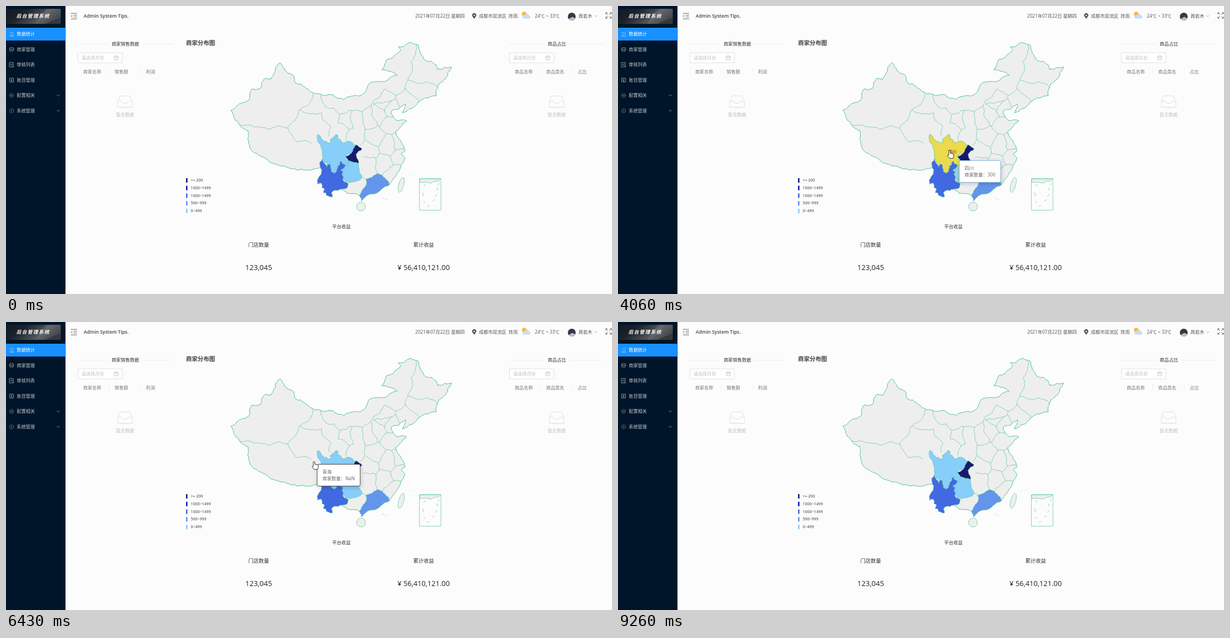
Animation, 1084 px wide and 517 px high, one loop 9870 ms. Source, as an HTML page:

```html
<!DOCTYPE html>
<html>
<head>
<meta charset="utf-8">
<title>Admin dashboard</title>
<style>
  html, body { margin: 0; width: 100%; height: 100%; overflow: hidden; background: #fcfcfc; }
  body, text { font-family: "Open Sans", "Noto Sans CJK SC", "Noto Sans CJK", sans-serif; }
  svg { position: absolute; left: 0; top: 0; }
  .land, .line { stroke: #62cb98; stroke-width: .75; vector-effect: non-scaling-stroke; stroke-linejoin: round; }
  .land { fill: #eee; }
  .line { fill: none; }
  .icon { fill: none; stroke-width: .8; }
  #tip { position: absolute; left: 0; top: 0; padding: 7px 9px; font-size: 8.2px; line-height: 12px; color: #666;
    white-space: nowrap; background: #fff; border: 1px solid; border-radius: 3px; box-shadow: 1px 2px 7px rgba(0,0,0,.2); }
</style>
</head>
<body>
<svg id="stage" width="1084" height="517" viewBox="0 0 1084 517"></svg>
<div id="tip"></div>
<svg width="1084" height="517">
  <path id="arrow" d="M0 0V14L3.4 11 5.6 16 7.8 15 5.7 10.3H10Z" fill="#fff" stroke="#000" stroke-width=".8"/>
  <path id="hand" d="M-1.3 8.5V1Q0-.8 1.3 1V5.5Q3 4.6 3.8 6 5.2 5.2 6 6.7 7.5 6.3 7.6 8V11L6.3 14.5H.2L-3.6 9.5Q-3.5 7.6-1.3 9Z" fill="#fff" stroke="#222" stroke-width=".9"/>
</svg>
<script>
const LOOP = 9870, LAG = 200, FADE = 300, YELLOW = '#fedd2a';
const clamp = v => Math.max(0, Math.min(1, v));
const noise = (x, y) => { const s = Math.sin(x * 12.9898 + y * 78.233) * 43758.5453; return s - Math.floor(s) - .5; };
const pairs = str => str.match(/\d+ \d+/g).map(pair => pair.split(' ').map(Number));

// Adds a jagged edge from a to b; the same edge walked backwards gives the same line.
function jag(a, b, out) {
  const dx = b[0] - a[0], dy = b[1] - a[1];
  if (Math.hypot(dx, dy) < 3.5) return out.push(b);
  const side = dx > 0 || (dx === 0 && dy > 0) ? 1 : -1;
  const k = noise(a[0] + b[0], a[1] + b[1]) * .26 * side;
  const mid = [(a[0] + b[0]) / 2 - dy * k, (a[1] + b[1]) / 2 + dx * k];
  jag(a, mid, out);
  jag(mid, b, out);
}
function coast(points) {
  const out = [points[0]];
  points.forEach((p, i) => jag(p, points[(i + 1) % points.length], out));
  return toPath(out);
}
function edge(a, b) {
  const out = [a];
  jag(a, b, out);
  return toPath(out);
}
const toPath = points => 'M' + points.map(p => p.map(v => v.toFixed(1)).join()).join('L');

// Splits the plane into the areas nearest to each site; `next` names the site across the edge that starts at `p`.
function cell(site, sites) {
  let poly = [[380, 40], [820, 40], [820, 390], [380, 390]].map(p => ({ p }));
  const away = (p, s) => Math.hypot(p[0] - s.p[0], p[1] - s.p[1]) ** 2;
  for (const other of sites) {
    if (other === site) continue;
    const cut = [];
    poly.forEach((a, i) => {
      const b = poly[(i + 1) % poly.length];
      const da = away(a.p, site) - away(a.p, other), db = away(b.p, site) - away(b.p, other);
      if (da <= 0) cut.push(a);
      if ((da <= 0) !== (db <= 0)) {
        const k = da / (da - db);
        cut.push({ p: a.p.map((v, n) => v + (b.p[n] - v) * k), next: da <= 0 ? other : a.next });
      }
    });
    poly = cut;
  }
  return poly.map(({ p, next }) => ({ p: p.map(Math.round), next }));
}

// A map: one outline, districts grown around their centres, some of them coloured.
function mapLayer(id, outline, named, single, colors, extra = '') {
  const sites = pairs(single).map((p, i) => ({ p, name: i }));
  for (const name in named) sites.push(...pairs(named[name]).map(p => ({ p, name })));
  let lines = '';
  const shapes = {};
  sites.forEach((site, i) => {
    const poly = cell(site, sites);
    shapes[site.name] = (shapes[site.name] || '') + coast(poly.map(v => v.p)) + 'Z';
    poly.forEach(({ p, next }, k) => {
      const shared = next && sites.indexOf(next) > i && next.name !== site.name;
      if (shared && site.name !== 'outlined' && next.name !== 'outlined') lines += edge(p, poly[(k + 1) % poly.length].p);
    });
  });
  const d = coast(pairs(outline));
  const fills = Object.keys(colors).map(name =>
    `<path d="${shapes[name]}" fill="${colors[name]}"/><path id="${name}" d="${shapes[name]}" fill="${YELLOW}" opacity="0"/>`).join('');
  return `<g id="${id}"><clipPath id="${id}Clip"><path d="${d}"/></clipPath><path class="land" d="${d}"/>` +
    `<g clip-path="url(#${id}Clip)">${fills}<path class="line" d="${lines}"/></g><path class="line" d="${d}"/>${extra}</g>`;
}
const province = (name, outline, fill, transform = '') => [[name, fill, 1], [name + 'Glow', YELLOW, 0]].map(([id, color, opacity]) =>
  `<path class="land" id="${opacity ? id + 'Base' : name}" d="${coast(pairs(outline))}" style="fill:${color}" opacity="${opacity}" transform="${transform}"/>`).join('');

const chinaOutline = `402 187 413 179 434 169 439 150 455 148 463 130 474 131 490 102 499 116 512 123 518 138 553 158 584 159 605 168
  637 159 650 139 666 135 700 124 672 115 680 97 706 78 702 73 724 65 737 70 750 98 769 105 772 114 797 109 787 130 774 140
  770 161 737 173 709 192 715 176 689 189 692 198 700 206 717 206 697 225 707 245 714 260 707 265 714 273 699 302 683 323
  650 338 636 350 633 341 610 336 580 310 563 290 530 293 502 289 482 284 450 266 436 254 433 224 410 205`;
const chinaCentres = {
  新疆: '470 170 470 197 498 193 524 160', 西藏: '465 243 487 240 530 272 540 278', 青海: '530 213 550 201 562 221',
  甘肃: '553 180 582 197 598 227', 内蒙古: '587 169 600 178 632 174 660 152 690 138 705 105 712 85', 陕西: '630 203 624 236',
  河北: '668 194 676 166', 吉林: '738 156 760 154', 黑龙江: '745 118 740 88 772 132', 广东: '666 321 645 341', 贵州: '617 295',
  outlined: '575 255 610 256 624 263 578 302 585 325'
};
const chinaSingles = `611 205 650 200 678 179 687 185 718 172 690 212 660 236 704 245 684 250 648 258 705 273 677 285 648 287 692 301 626 328`;
const chongqing = '626 249 637 257 626 266 631 282 613 278 607 270 620 261';

const sichuanOutline = `527 297 519 284 507 275 501 291 492 250 488 205 481 172 454 120 446 88 450 68 460 65 475 78 486 102 497 107 505 123
  515 113 533 128 556 128 549 104 563 90 577 82 590 66 598 65 610 75 607 99 631 108 633 120 660 128 672 119 712 121 731 143
  753 152 738 180 708 222 692 211 675 218 671 260 691 264 683 282 691 300 672 308 640 298 637 280 624 272 602 310 603 345
  570 369 548 335 553 324`;
const sichuanCentres = {
  甘孜藏族自治州: '530 165 560 200 558 245 515 270', 凉山彝族自治州: '560 283 545 286 590 300 588 340',
  阿坝: '570 140 598 172', 雅安: '606 215 595 242'
};
const sichuanSingles = '645 150 680 135 707 143 730 165 685 185 640 178 620 205 660 203 645 222 622 238 625 260 660 240 650 257 650 282 675 285 705 205 560 350';

const yunnanOutline = `519 65 526 92 549 118 551 132 568 107 580 112 589 150 589 167 612 178 629 165 632 148 656 106 655 88 669 87 671 103
  697 110 692 132 663 152 668 163 680 165 671 190 682 212 681 237 721 262 716 288 698 303 650 306 640 317 628 312 596 326
  588 332 597 365 570 360 549 353 546 335 524 331 535 305 527 296 514 291 510 257 480 267 478 233 494 204 508 188 514 152
  497 116 496 97 511 84`;
const yunnanSingles = '530 108 502 112 555 150 532 186 505 215 492 240 535 265 587 205 622 210 655 200 655 130 592 258 630 280 685 270 562 308 572 348';

// Small drawing helpers
const text = (x, y, size, content, fill = '#555', extra = '') =>
  `<text x="${x}" y="${y + size * .36}" font-size="${size}" fill="${fill}" ${extra}>${content}</text>`;
const middle = 'text-anchor="middle"';
const rect = (x, y, w, h, fill, extra = '') => `<rect x="${x}" y="${y}" width="${w}" height="${h}" fill="${fill}" ${extra}/>`;
const icon = (d, stroke, x = 0, y = 0) => `<path class="icon" d="${d}" stroke="${stroke}" transform="translate(${x} ${y})"/>`;
const chevron = (x, y, color) => icon('M-2.5-1.2L0 1.2 2.5-1.2', color, x, y);

function sidebar() {
  const items = [
    ['数据统计', 'M-4 4H4M-3 3V1M0 3V0M3 3V-1M-4-1L-1-3 1-2 4-4'],
    ['商家管理', 'M-3-3H3L4 0H-4ZM-3 0V3H3V0'],
    ['审核列表', 'M-4-4H3V4H-4ZM-2-1H2M-2 1H0M1 1L4 4'],
    ['账目管理', 'M-3.5-3.5H3.5V3.5H-3.5ZM-1.5-2L0 0 1.5-2M0 0V2.5M-1.5 .8H1.5'],
    ['配置相关', 'M-3.5 0A3.5 3.5 0 1 1 3.5 0A3.5 3.5 0 1 1-3.5 0M-3 0H3M0-1V2'],
    ['系统管理', 'M-3.5-2L0-4 3.5-2V2L0 4-3.5 2ZM-1 0A1 1 0 1 1 1 0A1 1 0 1 1-1 0']];
  return rect(0, 0, 106.4, 517, '#001529') + rect(1, 5, 97, 27, 'url(#banner)', 'rx="1.5"') +
    '<path d="M52 32L72 5H98V20L70 32Z" fill="#fff" opacity=".1"/>' +
    text(48.5, 18.3, 8.6, '后台管理系统', '#fff', middle + ' font-weight="900" font-style="italic" letter-spacing="1.4"') +
    rect(0, 39, 106.4, 23, '#1890ff') +
    items.map(([label, d], i) => {
      const y = 50.3 + i * 27.55, color = i ? '#a6adb4' : '#a9d6ff';
      return icon(d, i > 3 ? '#6b7783' : color, 10, y) + text(19.3, y, 8.1, label, i ? '#c3c8cd' : '#fff') + (i > 3 ? chevron(93.5, y, color) : '');
    }).join('');
}
function header() {
  return icon('M0 0H11M5 3.3H11M5 6.6H11M0 10H11M3 2.8L.5 5 3 7.2', '#444', 116, 13.2) +
    text(139, 18, 8.55, 'Admin System Tips.', '#444', 'font-weight="600"') +
    text(732, 18, 8.2, '2021年07月22日 星期四') +
    '<path d="M837.5 23L834.8 19.2A3.7 3.7 0 1 1 840.2 19.2Z" fill="#555"/><circle cx="837.5" cy="17" r="1.3" fill="#fcfcfc"/>' +
    text(846, 18, 8.2, '成都市双流区') + text(899, 18, 8.2, '阵雨') +
    '<circle cx="927" cy="14.5" r="4.3" fill="#f7b944"/><path d="M926 22.5Q922 21 924.5 17.5 926 15.5 928 16.5 930 12.5 934 14.5 935.5 15.5 935.5 17 939.5 18 938 21 937 22.8 935 22.8Z" fill="#c9dcf2"/>' +
    text(946, 18, 8.2, '24℃ ~ 33℃') +
    '<circle cx="1012" cy="19" r="7" fill="#343943"/><path d="M1006.5 23.3A7 7 0 0 0 1018.2 22L1013 19.5Z" fill="#b9c0c8"/>' +
    text(1024, 18, 8.2, '周若木') + chevron(1055, 18, '#999') +
    icon('M0 3V0H3M7 0H10V3M10 7V10H7M3 10H0V7M0 0L3.7 3.7M10 0L6.3 3.7M10 10L6.3 6.3M0 10L3.7 6.3', '#444', 1073, 12);
}
function panel(x, title, columns) {
  const half = title.length * 4.1 + 6;
  return `<g transform="translate(${x})">` + icon(`M128 68.5H${213.5 - half}M${213.5 + half} 68.5H298`, '#ebebeb') +
    text(213.5, 68, 8.2, title, '#333', middle) +
    rect(128.5, 84, 79.5, 18, '#fff', 'stroke="#d9d9d9" stroke-width=".8" rx="1"') + text(135, 93, 8.1, '请选择月份', '#bfbfbf') +
    icon('M0 1H7V7.5H0ZM0 3.3H7M2 0V2M5 0V2', '#bbb', 193.7, 89) +
    columns.map((label, i) => text(138 + i * 56.3, 117.8, 8.1, label, '#777')).join('') +
    icon('M184.5 112V123M240.5 112V123', '#eee') +
    '<ellipse cx="213" cy="181" rx="14" ry="3" fill="#f5f5f5"/><path d="M200 171L204.5 161.5H221.5L226 171V181.5H200ZM200 171H207.5Q208.5 174.5 210 174.5H216Q217.5 174.5 218.5 171H226" fill="#fdfdfd" stroke="#d9d9d9" stroke-width=".8"/>' +
    text(213, 195, 8.1, '暂无数据', '#bfbfbf', middle) + '</g>';
}
function legend() {
  return [['&gt;= 200', '#191970'], ['1000~1499', '#1717c4'], ['1000~1499', '#4169e1'], ['500~999', '#6495ed'], ['0~499', '#87cefa']]
    .map(([label, color], i) => rect(322, 309 + i * 13.75, 2.6, 8, color) + text(330.5, 312.5 + i * 13.75, 7, label, '#333')).join('');
}
function islands() {
  return '<ellipse class="land" cx="635" cy="360" rx="8" ry="8"/><ellipse class="land" cx="707" cy="321" rx="4.5" ry="14" transform="rotate(15 707 321)"/>' +
    '<path class="land" d="M740 310H778L774 314 765 315 761 318 750 316 740 317Z"/><rect class="line" x="739.5" y="310" width="38.5" height="56.5"/>' +
    '<path class="line" d="M750 320L747 324M745 335L747 341M747 350L749 353M753 360L757 358M763 351L767 347M768 342L771 338M771 331V326M773 322L775 318M722 304H723M730 302H731M675 344V346M680 346V348"/>';
}

const $ = id => document.getElementById(id);
const labels = { 贵州: [617, 295], 四川: [598, 261], 云南: [581.5, 311], 甘孜藏族自治州: [572.5, 220.5], 凉山彝族自治州: [572, 300] };
$('stage').innerHTML =
  '<defs><linearGradient id="banner" x2="1" y2=".35"><stop stop-color="#111a25"/><stop offset=".35" stop-color="#1b222b"/><stop offset=".75" stop-color="#535559"/><stop offset="1" stop-color="#34383d"/></linearGradient></defs>' +
  sidebar() + header() +
  panel(0, '商家销售数据', ['商家名称', '销售额', '利润']) +
  panel(772, '商品占比', ['商品名称', '商品类名', '占比']) +
  text(322, 66, 10.4, '商家分布图', '#444', 'font-weight="700"') + legend() +
  mapLayer('china', chinaOutline, chinaCentres, chinaSingles, { 贵州: '#87cefa', 广东: '#6495ed' },
    province('四川', sichuanOutline, '#87cefa', 'matrix(.2342 0 0 .234 451.4 215.5)') +
    province('云南', yunnanOutline, '#4169e1', 'matrix(.2284 0 0 .229 447.6 259.1)') +
    province('重庆', chongqing, '#191970') + islands()) +
  mapLayer('sichuanMap', sichuanOutline, sichuanCentres, sichuanSingles, { 凉山彝族自治州: '#eee', 甘孜藏族自治州: '#eee' }) +
  mapLayer('yunnanMap', yunnanOutline, {}, yunnanSingles, {}) +
  Object.entries(labels).map(([name, [x, y]]) => text(x, y, 7.2, name, '#641432', `${middle} id="${name}Label"`)).join('') +
  text(600, 396, 8.2, '平台收益', '#333', middle) + text(452, 429, 9.3, '门店数量', '#333', middle) + text(747, 429, 9.3, '累计收益', '#333', middle) +
  text(452, 469.5, 13, '123,045', '#222', middle) + text(747, 469.5, 12.8, '¥ 56,410,121.00', '#222', middle);

// [time, x, y] of the pointer tip
const pointerPath = [[1190, 0, 4], [1470, 21, 14], [2450, 577, 318], [2930, 576, 294], [3400, 593, 270], [3860, 599, 266], [4060, 593, 259],
  [4820, 593, 259], [5160, 585, 322], [5340, 537, 254], [5540, 541, 240], [6100, 541, 240], [6430, 551, 250], [7000, 577, 310], [8420, 577, 310], [9020, 551, 268]];
// [start, region under the pointer, its count]
const stops = [[2450, '云南', 1221], [3190, '四川', 300], [3580, '贵州', 300], [3810, '四川', 300], [4300, '雅安市', NaN],
  [5060, '凉山彝族自治州', NaN], [5300, '甘孜藏族自治州', NaN], [5920, '青海', NaN], [6550, '四川', 300],
  [6750, '云南', 1221], [7670, '普洱市', NaN], [8420, '云南', 1221], [8750, '西藏', NaN]];
const scenes = [[0, 'china'], [4300, 'sichuanMap'], [5920, 'china'], [7670, 'yunnanMap'], [8420, 'china']];

const latest = (list, t) => list.filter(entry => entry[0] <= t).pop();
const show = (id, on) => { $(id).style.display = on ? '' : 'none'; };
function pointerAt(t) {
  const next = pointerPath.find(p => p[0] > t), last = latest(pointerPath, t);
  if (!last || !next) return (last || next).slice(1);
  const k = (t - last[0]) / (next[0] - last[0]);
  return [1, 2].map(i => last[i] + (next[i] - last[i]) * k);
}
function glowOf(name, t) {
  return Math.max(...stops.map(([start, region], i) => {
    const end = i + 1 < stops.length ? stops[i + 1][0] : 9080;
    return region === name ? clamp((t - start) / FADE) * (1 - clamp((t - end) / FADE)) : 0;
  }));
}

function draw(now) {
  const t = now % LOOP, scene = latest(scenes, t)[1], stop = latest(stops, t);
  for (const id of ['china', 'sichuanMap', 'yunnanMap']) show(id, id === scene);
  for (const name in labels) {
    $(name).setAttribute('opacity', glowOf(name, t));
    show(name + 'Label', stop && stop[1] === name);
  }

  const [x, y] = pointerAt(t), onScreen = t >= 1190 && t < 9140;
  show('arrow', onScreen && t < 2250);
  show('hand', onScreen && t >= 2250);
  for (const id of ['arrow', 'hand']) $(id).setAttribute('transform', `translate(${x} ${y})`);

  const tip = $('tip');
  tip.style.opacity = stop ? 1 - clamp((t - 9080) / 180) : 0;
  if (stop) {
    const [, name, count] = stop, [tx, ty] = pointerAt(t - LAG);
    tip.innerHTML = `${name}<br>商家数量：${count}`;
    tip.style.borderColor = count > 999 ? '#4169e1' : count ? '#87b8e0' : '#555';
    tip.style.transform = `translate(${tx + 11}px, ${ty + 11}px)`;
  }
  requestAnimationFrame(draw);
}
draw(0);
</script>
</body>
</html>
```
